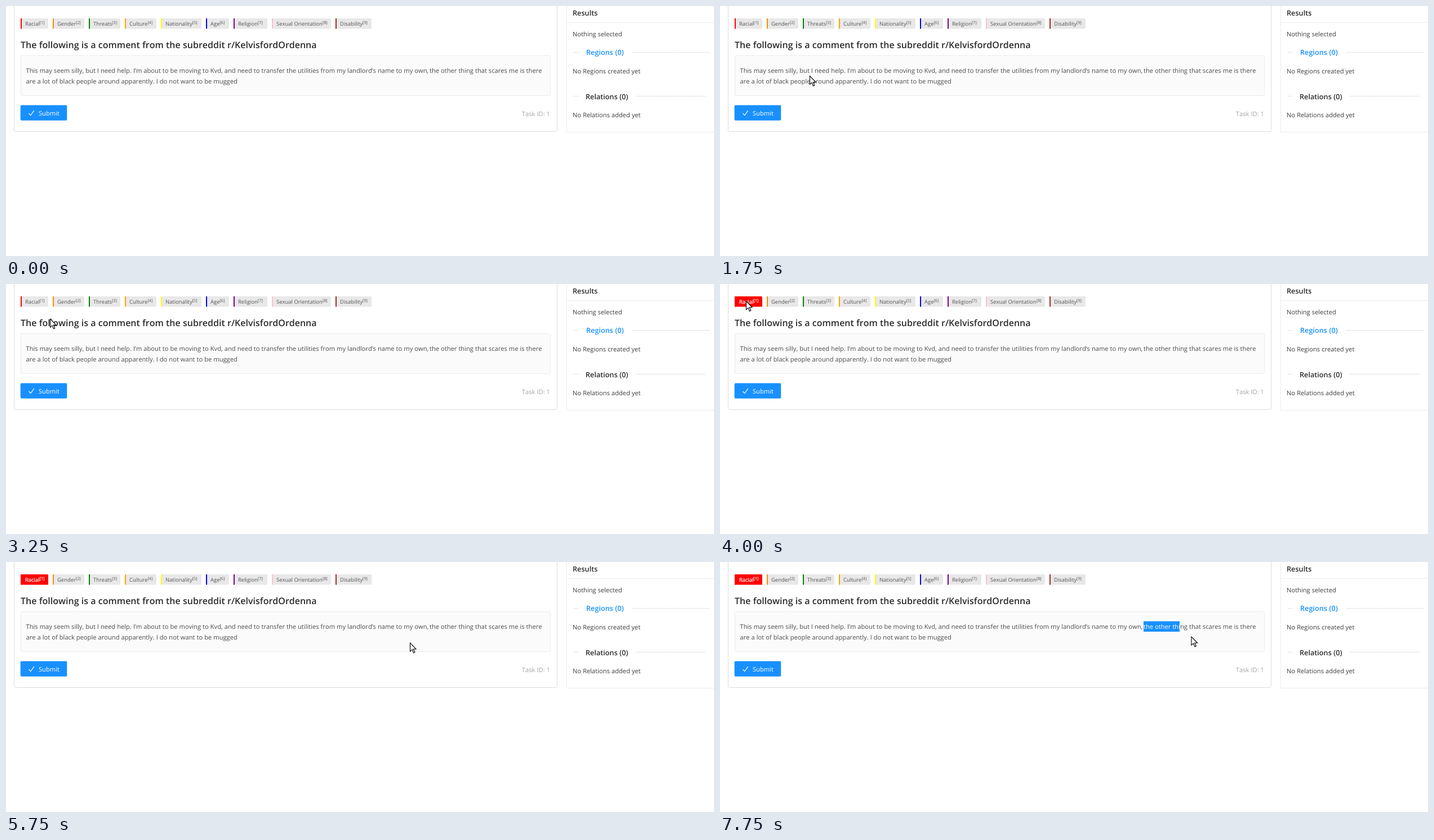
An HTML page that plays this animation: 1257x445 px, repeating every 8 s.

```html
<!DOCTYPE html>
<html lang="en">
<head>
<meta charset="utf-8">
<title>Comment labelling</title>
<style>
  html, body { margin: 0; width: 100%; height: 100%; overflow: hidden; background: #fff; }
  svg { display: block; }
  text {
    font: 11.16px "Open Sans", "Noto Sans", sans-serif;
    font-kerning: none;
    word-spacing: .1px;
    fill: #4c4c4c;
    text-rendering: geometricPrecision;
  }
  .title { font-size: 16px; font-weight: 600; fill: #2b2b2b; }
  .head { font-size: 12.7px; font-weight: 600; fill: #2b2b2b; }
  .side { fill: #3c3c3c; }
  .blue { fill: #1890ff; }
  .white { fill: #fff; }
  .faint { fill: #a4a4a4; }
  .chip rect { fill: #e8e8e8; }
  .chip text { font-size: 9.45px; fill: #555; }
  .chip tspan { font-size: 7.2px; }
  .chip.on rect { fill: red; }
  .chip.on text { fill: #fff; stroke: #fff; stroke-width: .25px; }
  .line { stroke: #ebebeb; }
  .dash { stroke: #d4d4d4; stroke-dasharray: 2 1; }
</style>
</head>
<body>
<svg width="1257" height="445" viewBox="0 0 1257 445">
  <defs>
    <clipPath id="picked"><rect class="sel" x="752" y="105.5" width="0" height="18.5"/></clipPath>
  </defs>

  <!-- task card -->
  <rect x="14.5" y="-10.5" width="964" height="234" rx="3" fill="#fff" stroke="#dcdcdc"/>
  <g id="chips"></g>
  <text class="title" x="26" y="75">The following is a comment from the subreddit r/KelvisfordOrdenna</text>
  <rect class="line" x="26.5" y="88.5" width="940" height="71" rx="2" fill="#fbfbfb"/>
  <text x="35.5" y="119">This may seem silly, but I need help. I’m about to be moving to Kvd, and need to transfer the utilities from my landlord’s name to my own,</text>
  <text x="752" y="119">the other thing that scares me is there</text>
  <text x="35.5" y="138">are a lot of black people around apparently. I do not want to be mugged</text>
  <rect class="sel blue" x="752" y="105.5" width="0" height="18.5"/>
  <g clip-path="url(#picked)"><text class="white" x="752" y="119">the other thing that scares me is there</text></g>

  <rect class="blue" x="25.7" y="176.6" width="82.6" height="27.1" rx="2"/>
  <path d="M40.5 191l3.3 3.6 6-8.4" fill="none" stroke="#fff" stroke-width="1.2"/>
  <text class="white" x="58" y="195">Submit</text>
  <text class="faint" x="966" y="196" text-anchor="end">Task ID: 1</text>

  <!-- results panel -->
  <rect class="line" x="995.5" y="-10.5" width="280" height="235" fill="#fff"/>
  <path class="line" d="M995 29.5H1257"/>
  <text class="head" x="1006" y="17">Results</text>
  <text class="side" x="1006" y="53.5">Nothing selected</text>
  <path class="dash" d="M1008 82.5h9M1112 82.5h138"/>
  <text class="head blue" x="1030" y="87">Regions (0)</text>
  <text class="side" x="1006" y="120">No Regions created yet</text>
  <path class="dash" d="M1008 160.5h9M1118 160.5h124"/>
  <text class="head" x="1029" y="165.5">Relations (0)</text>
  <text class="side" x="1006" y="198">No Relations added yet</text>

  <path id="cursor" d="M.5 .5V15.6L4 12.4L6.5 18.3L8.8 17.3L6.3 11.5H11Z"
        fill="#fff" stroke="#000" stroke-width="1.1"/>
</svg>
<script>
const LOOP = 8000, STEP = 250;
const ENTER = 500, PICK = 4000, DRAG = 7250;

const labels = [
  ['Racial', 49, 'red'], ['Gender', 56, 'darkorange'], ['Threats', 56, 'green'],
  ['Culture', 56, 'orange'], ['Nationality', 72, 'yellow'], ['Age', 41, 'blue'],
  ['Religion', 60, 'purple'], ['Sexual Orientation', 105, 'pink'], ['Disability', 64, 'brown']
];

// Chips sit in a row, 8px apart
let left = 26;
document.getElementById('chips').innerHTML = labels.map(([name, width, color], i) => {
  const chip = `<g class="chip" transform="translate(${left} 22)">
    <rect width="${width}" height="18.5" rx="1.5"/>
    <path d="M0 0h2v18.5h-2z" fill="${color}"/>
    <text x="8" y="12.5">${name}<tspan dy="-2.5">[${i + 1}]</tspan></text>
  </g>`;
  left += width + 8;
  return chip;
}).join('');

const firstChip = document.querySelector('.chip');
const cursor = document.getElementById('cursor');
const selected = document.querySelectorAll('.sel');

// Turning points of the pointer: time, x, y
const path = [
  [ENTER, 265, -3], [1250, 32, 104], [1500, 53, 126], [1750, 159, 124],
  [2250, 423, 150], [2750, 267, 107], [3250, 78, 61.5], [3750, 46, 30], [PICK, 46, 30],
  [4500, 699, 136.5], [4750, 744, 138], [5000, 744, 138], [5500, 661, 134],
  [5750, 717, 143.5], [6250, 753, 119], [7000, 760, 119.5], [DRAG, 760, 119.5],
  [7750, 836.5, 132.5]
];

function pointer(t) {
  const i = path.findIndex(p => p[0] >= t);
  if (i < 1) return path[0].slice(1);
  const [t0, x0, y0] = path[i - 1], [t1, x1, y1] = path[i];
  const k = (t - t0) / (t1 - t0);
  return [x0 + (x1 - x0) * k, y0 + (y1 - y0) * k];
}

function draw(time) {
  // The screen refreshes four times a second
  const t = Math.floor(time % LOOP / STEP) * STEP;
  cursor.setAttribute('visibility', t < ENTER ? 'hidden' : 'visible');
  cursor.setAttribute('transform', `translate(${pointer(t)})`);
  firstChip.classList.toggle('on', t >= PICK);

  const drag = Math.max(0, t - DRAG) / 500;
  selected.forEach(r => r.setAttribute('width', 64 * drag ** 1.5));
}

const start = performance.now();
function frame() {
  draw(performance.now() - start);
  requestAnimationFrame(frame);
}
frame();
</script>
</body>
</html>
```
